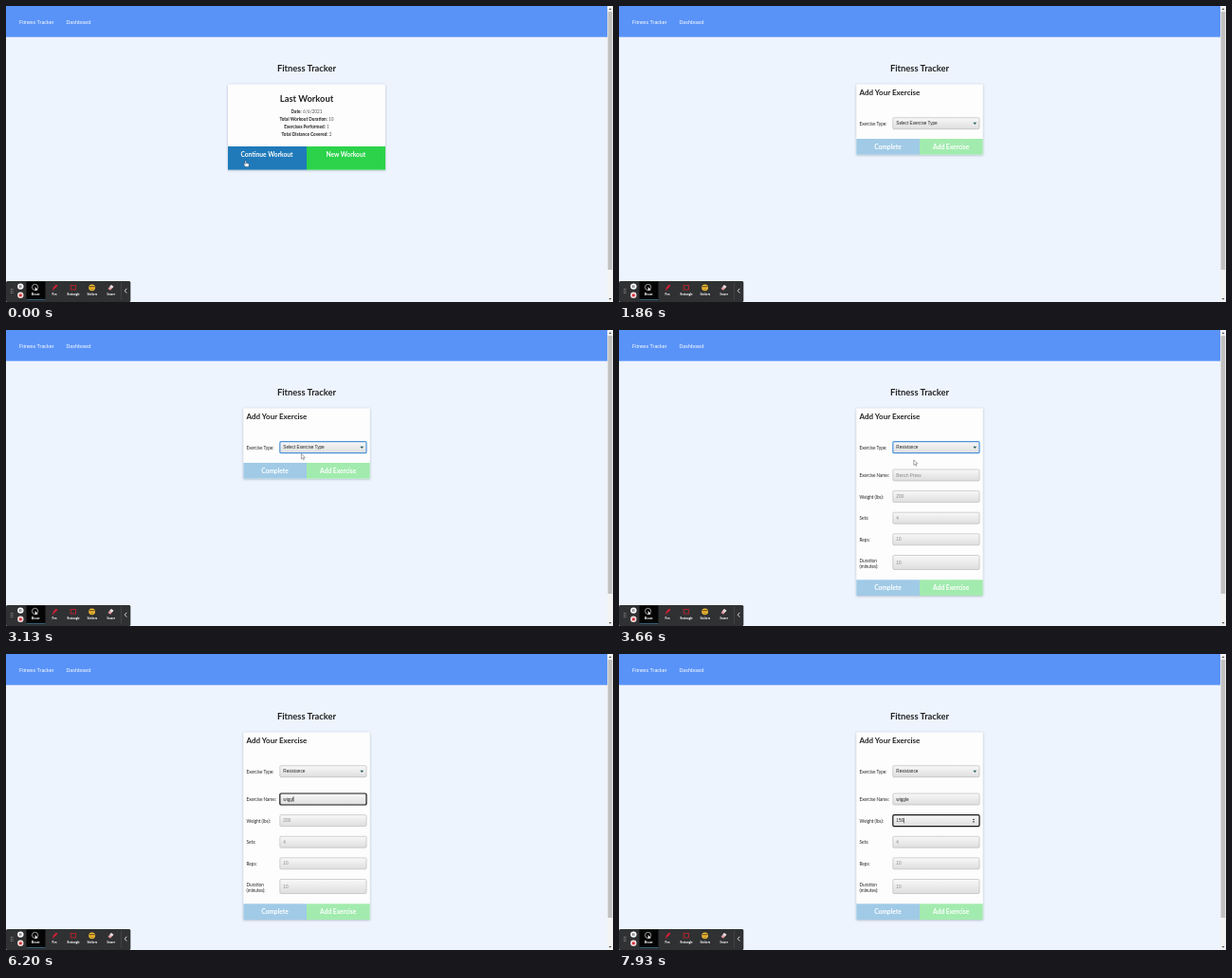
Write an HTML page that moves like this. It is 640 by 312 pixels and loops after 8000 ms.

```html
<!DOCTYPE html>
<html lang="en">
<head>
<meta charset="utf-8">
<title>Fitness Tracker</title>
<style>
html, body { margin: 0; width: 100%; height: 100%; overflow: hidden; background: #edf4fe; }
svg { display: block; width: 100vw; height: 100vh; }
text { font-family: Lato, sans-serif; font-size: 4.67px; fill: #222; white-space: pre; }
.bold { font-weight: 700; }
.mid { text-anchor: middle; }
.ui { font-family: "Liberation Sans", Arial, sans-serif; }
.hint { fill: #858585; }
.button { font-size: 6.67px; font-weight: 700; fill: #fff; text-anchor: middle; }
.tool { font: 700 2.7px "Open Sans", sans-serif; fill: #fff; text-anchor: middle; }
</style>
</head>
<body>
<svg id="stage" viewBox="0 0 640 312" preserveAspectRatio="none">
  <defs>
    <linearGradient id="field" x2="0" y2="1">
      <stop stop-color="#f8f8f8"/><stop offset="1" stop-color="#dedede"/>
    </linearGradient>
    <filter id="shadow" x="-10%" y="-10%" width="120%" height="120%">
      <feDropShadow dx="0" dy=".6" stdDeviation="1" flood-color="#345" flood-opacity=".38"/>
    </filter>
  </defs>
  <rect width="640" height="312" fill="#edf4fe"/>
  <rect width="634" height="32.7" fill="#5993f8"/>
  <text class="ui" x="14" y="18.5" style="font-size:5.33px;fill:#fff">Fitness Tracker</text>
  <text class="ui" x="63.5" y="18.5" style="font-size:5.33px;fill:#fff">Dashboard</text>
  <text class="mid bold" x="317" y="68.8" style="font-size:9.33px">Fitness Tracker</text>
  <g id="summary"></g>
  <g id="editor"></g>
  <g id="scrollbar">
    <rect x="634" width="6" height="312" fill="#f3f3f3"/>
    <rect x="634.6" y="6" width="4.6" height="272" fill="#c1c1c1"/>
    <path d="M635.5 4l1.5-1.8 1.5 1.8zM635.5 308l1.5 1.8 1.5-1.8z" fill="#505050"/>
  </g>
  <g id="toolbar"></g>
  <g id="arrow"><path d="M0 0V5.4L1.3 4.3 2.2 6.2 3.1 5.8 2.2 3.9H3.9Z" fill="#fff" stroke="#444" stroke-width=".45"/></g>
  <g id="hand"><path d="M-.9 .4Q-.3-.5 .3.4V2.4L2.7 3Q3.4 3.3 3.2 4.3L2.7 6.3H-.5L-2.2 4Q-2-.0-.9 3.7Z" fill="#fff" stroke="#234" stroke-width=".4"/></g>
</svg>
<script>
const LOOP = 8000;
const OPEN_EDITOR = 1860, FOCUS_SELECT = 3000, SHOW_FIELDS = 3660;
const FOCUS_NAME = 4460, FOCUS_WEIGHT = 6400;
const BLINK = 533;
const $ = id => document.getElementById(id);

const rect = (x, y, w, h, fill, extra = '') =>
  `<rect x="${x}" y="${y}" width="${w}" height="${h}" fill="${fill}" ${extra}/>`;
const text = (x, y, str, cls = '', extra = '') =>
  `<text x="${x}" y="${y}" class="${cls}" ${extra}>${str}</text>`;
const show = (el, on) => el.setAttribute('display', on ? 'inline' : 'none');

const fieldBox = (id, y, h = 12) =>
  rect(288.8, y - h / 2, 91.2, h, 'url(#field)', `id="${id}" rx="1.3" stroke="#b4b4b4" stroke-width=".6"`);

function buildSummary() {
  const rows = [['Date', '6/6/2021'], ['Total Workout Duration', 10],
    ['Exercises Performed', 1], ['Total Distance Covered', 2]];
  $('summary').innerHTML =
    rect(234, 82.7, 166, 90, '#fdfdfd', 'filter="url(#shadow)"') +
    rect(234, 148, 83, 24.7, '#207aba') + rect(317, 148, 83, 24.7, '#2cd34a') +
    text(317, 100.5, 'Last Workout', 'mid bold', 'style="font-size:9.33px"') +
    rows.map(([label, value], i) => text(317, 112.6 + i * 8,
      `<tspan font-weight="700">${label}</tspan>: <tspan fill="#555">${value}</tspan>`, 'mid')).join('') +
    text(275, 159, 'Continue Workout', 'button') + text(358.3, 159, 'New Workout', 'button');
}

function buildEditor() {
  const rows = [['name', 'Exercise Name:', 153, 'Bench Press'], ['weight', 'Weight (lbs):', 175.6, '200'],
    ['sets', 'Sets:', 198.2, '4'], ['reps', 'Reps:', 220.8, '10']];
  $('editor').innerHTML =
    rect(250.3, 82.7, 133.4, 74, '#fdfdfd', 'id="card" filter="url(#shadow)"') +
    text(253.6, 94, 'Add Your Exercise', 'bold', 'style="font-size:8px"') +
    text(253.6, 125.6, 'Exercise Type:') + fieldBox('select', 123.7) +
    text(292.3, 125.2, '', 'ui', 'id="choice"') +
    '<path d="M373.3 122.8h3.8l-1.9 2.1z" fill="#1d5a57"/>' +
    '<g id="fields">' +
    rows.map(([id, label, y, hint]) => text(253.6, y + 1.9, label) + fieldBox(id, y) +
      text(292.3, y + 1.5, hint, 'ui hint', `id="${id}Text"`)).join('') +
    text(253.6, 245.2, 'Duration') + text(253.6, 251.3, '(minutes):') +
    fieldBox('duration', 245, 15) + text(292.3, 246.5, '10', 'ui hint') +
    '<path id="spinner" d="M372.6 175l1.3-1.6 1.3 1.6zM372.6 176.3l1.3 1.6 1.3-1.6z" fill="#444"/>' +
    rect(0, 0, 0.5, 5.4, '#000', 'id="caret"') + '</g>' +
    '<g id="actions">' + rect(250.3, 0, 66.7, 16.7, '#a0cae6') + rect(317, 0, 66.7, 16.7, '#a2ebae') +
    text(283.5, 10.9, 'Complete', 'button') + text(350.2, 10.9, 'Add Exercise', 'button') + '</g>';
}

function buildToolbar() {
  const tools = ['Mouse', 'Pen', 'Rectangle', 'Stickers', 'Eraser'];
  const dots = Array.from({ length: 6 }, (_, i) =>
    `<circle cx="${5.3 + i % 2 * 1.7}" cy="${298.4 + (i >> 1) * 2}" r=".5" fill="#aaa"/>`).join('');
  $('toolbar').innerHTML =
    rect(0, 290, 131.3, 22, '#303133', 'rx="1.5"') + rect(21.5, 290.5, 20, 19.8, '#050505') +
    rect(21.5, 309.3, 20, 0.8, '#4c86a8') + rect(121.2, 291, 0.5, 19, '#555') + dots +
    '<circle cx="15.3" cy="295.6" r="3.2" fill="#fff"/><path d="M14.6 294.2v2.8M16 294.2v2.8" stroke="#333" stroke-width=".7"/>' +
    '<circle cx="15.3" cy="304.8" r="3.2" fill="#f2dede"/>' + rect(13.9, 303.4, 2.8, 2.8, '#d42b35', 'rx=".5"') +
    '<circle cx="30.6" cy="296.4" r="3.1" fill="none" stroke="#ddd" stroke-width=".7"/><path d="M30.7 296v4.4l1.1-.9 1.9.1z" fill="#fff"/>' +
    '<path d="M49 299l.7-2 3.2-3.4 1.5 1.4-3.3 3.2z" fill="#d91f35"/><path d="M48.4 299.8h2.4" stroke="#d91f35" stroke-width=".5"/>' +
    rect(68.2, 294.4, 5.2, 4.6, 'none', 'stroke="#d0202c" stroke-width=".8"') +
    '<circle cx="90.6" cy="296.8" r="3.4" fill="#f3bd32"/><path d="M87.8 295.8h5.6" stroke="#553b12" stroke-width="1"/><path d="M89 298.2q1.6 1.4 3.2 0" fill="none" stroke="#553b12" stroke-width=".5"/>' +
    '<path d="M107.5 298l3.4-4 2.5 1.8-3.4 4z" fill="#e79ba3"/><path d="M109.2 296l1.7-2 2.5 1.8-1.7 2z" fill="#ddd"/>' +
    tools.map((name, i) => text(31.2 + i * 19.9, 305.4, name, 'tool')).join('') +
    '<path d="M127.3 297.8l-2.1 2.4 2.1 2.4" fill="none" stroke="#fff" stroke-width=".8"/>';
}

// Pointer tip: [time, x, y]
const pointerPath = [[0, 253, 163.2], [60, 253, 163.2], [330, 272.3, 153.8], [1130, 272.3, 153.8],
  [1530, 275, 156], [1860, 275, 156], [2530, 305.2, 134.4], [2660, 306, 133], [2930, 312, 124],
  [3000, 312, 124], [3260, 310.8, 137], [3660, 310.8, 137], [4260, 300, 152], [LOOP, 300, 152]];

function pointerAt(t) {
  const i = pointerPath.findIndex(p => p[0] > t);
  const [t0, x0, y0] = pointerPath[i - 1], [t1, x1, y1] = pointerPath[i];
  const u = (t - t0) / (t1 - t0), k = u * u * (3 - 2 * u);
  return [x0 + (x1 - x0) * k, y0 + (y1 - y0) * k];
}

const nameKeys = [5730, 5860, 6000, 6130, 6200, 6330];
const weightKeys = [7200, 7400, 7730];
const typed = (word, keys, t) => word.slice(0, keys.filter(k => k <= t).length);

function setInput(id, value, hint) {
  const el = $(id + 'Text');
  el.textContent = value || hint;
  el.classList.toggle('hint', !value);
}

function setFocus(id, on, color) {
  const box = $(id);
  box.setAttribute('stroke', on ? color : '#b4b4b4');
  box.setAttribute('stroke-width', on ? 1.2 : 0.6);
}

function render(t) {
  const editing = t >= OPEN_EDITOR, expanded = t >= SHOW_FIELDS;
  show($('summary'), !editing);
  show($('editor'), editing);
  show($('fields'), expanded);
  $('card').setAttribute('height', expanded ? 197.3 : 74);
  $('actions').setAttribute('transform', `translate(0 ${expanded ? 263.3 : 140})`);
  $('choice').textContent = expanded ? 'Resistance' : 'Select Exercise Type';

  const onWeight = t >= FOCUS_WEIGHT, onName = t >= FOCUS_NAME && !onWeight;
  setFocus('select', t >= FOCUS_SELECT && t < FOCUS_NAME, '#4c94dc');
  setFocus('name', onName, '#161616');
  setFocus('weight', onWeight, '#161616');
  show($('spinner'), onWeight);

  const name = typed('wiggle', nameKeys, t), weight = typed('150', weightKeys, t);
  setInput('name', name, 'Bench Press');
  setInput('weight', weight, '200');

  const value = onWeight ? weight : name;
  const lastEdit = Math.max(...[FOCUS_NAME, FOCUS_WEIGHT, ...nameKeys, ...weightKeys].filter(k => k <= t));
  const caretOn = (onName || onWeight) && Math.floor((t - lastEdit) / BLINK) % 2 === 0;
  show($('caret'), caretOn);
  if (caretOn) {
    const width = value ? $(onWeight ? 'weightText' : 'nameText').getComputedTextLength() : 0;
    $('caret').setAttribute('x', 292.2 + width);
    $('caret').setAttribute('y', onWeight ? 172.9 : 150.3);
  }

  const [x, y] = pointerAt(t);
  for (const id of ['hand', 'arrow']) $(id).setAttribute('transform', `translate(${x} ${y})`);
  show($('hand'), !editing);
  show($('arrow'), editing && y < 147);
}

buildSummary();
buildEditor();
buildToolbar();
const start = performance.now();
function tick() {
  render((performance.now() - start) % LOOP);
  requestAnimationFrame(tick);
}
tick();
</script>
</body>
</html>
```
